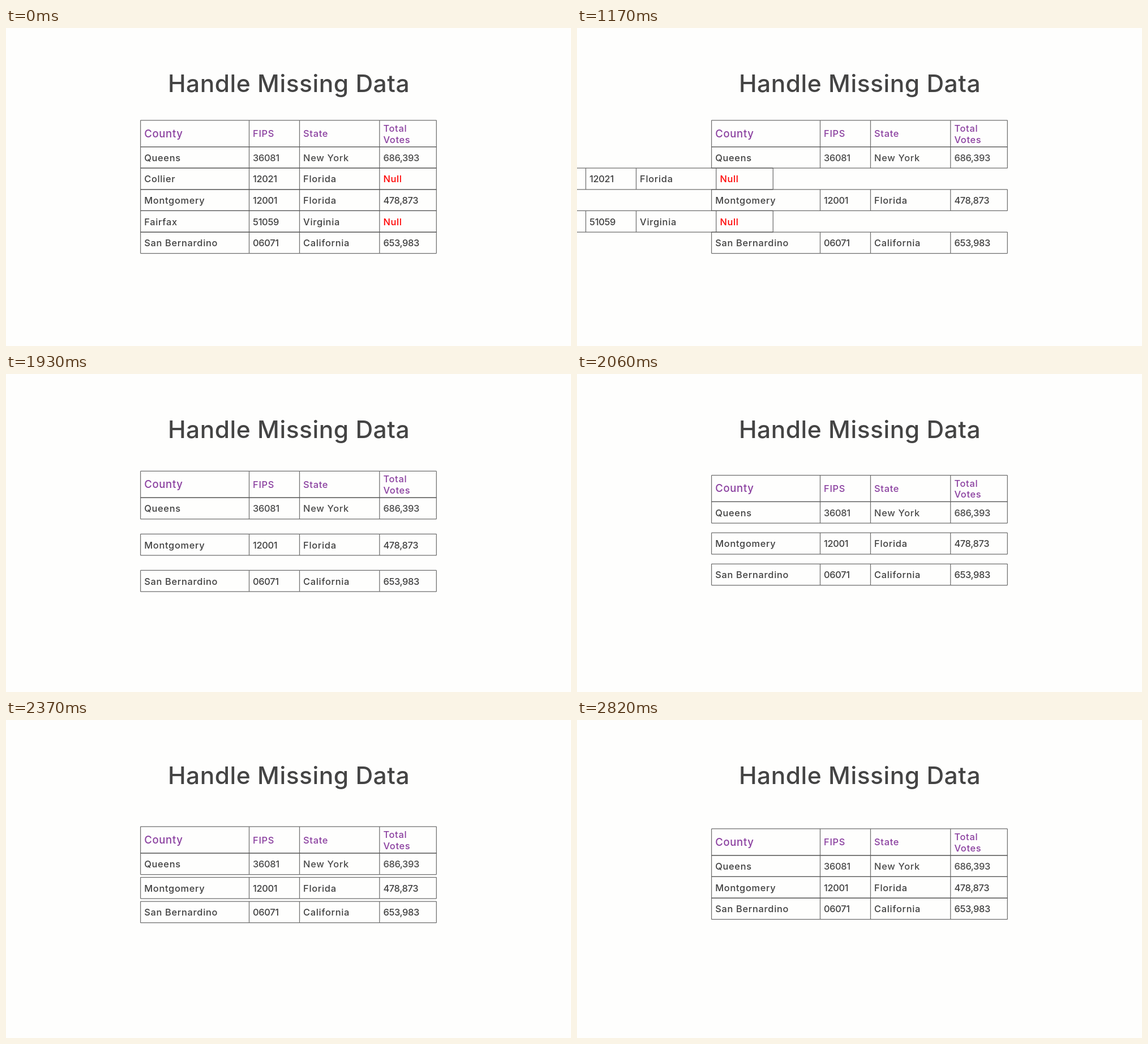
These frames come from a looping animation (998x561 px, 3.34 s). An HTML page:

```html
<!DOCTYPE html>
<html lang="en">
<head>
<meta charset="utf-8">
<title>Handle Missing Data</title>
<style>
  html, body { margin: 0; width: 100%; height: 100%; overflow: hidden; background: #fefefd; }
  svg { display: block; font: 550 16.4px Inter, sans-serif; letter-spacing: .042em; fill: #404040; }
  .title { font-size: 42.5px; font-weight: 500; letter-spacing: .012em; fill: #444; }
  .head { fill: #8a3f9f; }
  .big { font-size: 18.5px; }
  .light { font-weight: 500; fill: #4a4a4a; }
  .number { letter-spacing: -.02em; }
  .null { fill: #f00; }
  path { fill: none; stroke: #555; stroke-opacity: .85; stroke-width: 1.25; }
</style>
</head>
<body>
<svg width="998" height="561" viewBox="0 0 998 561">
  <text class="title" x="499.5" y="113" text-anchor="middle">Handle Missing Data</text>
</svg>
<script>
const LOOP = 3340, STEP = 34.28, DURATION = 1190;
const SLIDE_START = 890, CLOSE_START = 1680, SLIDE = 1135;
const COLUMNS = [237.6, 429.5, 518.5, 659.8, 760.3];
const HEAD_TOP = 162.8, BODY_TOP = 209.6, ROW = 37.6;
const svg = document.querySelector('svg');

function add(parent, tag, attrs, text = '') {
  const node = document.createElementNS(svg.namespaceURI, tag);
  for (const name in attrs) node.setAttribute(name, attrs[name]);
  node.textContent = text;
  return parent.appendChild(node);
}

function addRow(top, height) {
  const g = add(svg, 'g', {});
  const [left, right] = [COLUMNS[0], COLUMNS[4]];
  const rules = COLUMNS.map(x => `M${x} ${top}v${height}`).join('');
  add(g, 'path', { d: `M${left} ${top}H${right}M${left} ${top + height}H${right}${rules}` });
  return g;
}

const label = (g, column, y, text, className = '') =>
  add(g, 'text', { x: COLUMNS[column] + 6.6, y, class: className }, text);

const head = addRow(HEAD_TOP, BODY_TOP - HEAD_TOP);
label(head, 0, 192.6, 'County', 'head big');
label(head, 1, 192.3, 'FIPS', 'head');
label(head, 2, 192.3, 'State', 'head');
label(head, 3, 182.7, 'Total', 'head');
label(head, 3, 202.6, 'Votes', 'head');

const rows = [
  ['Queens', '36081', 'New York', '686,393'],
  ['Collier', '12021', 'Florida', 'Null'],
  ['Montgomery', '12001', 'Florida', '478,873'],
  ['Fairfax', '51059', 'Virginia', 'Null'],
  ['San Bernardino', '06071', 'California', '653,983'],
].map((cells, i) => {
  const top = BODY_TOP + i * ROW;
  const g = addRow(top, ROW);
  cells.forEach((text, column) => {
    const classes = [];
    if (/^\d/.test(text)) classes.push('number');
    if (text === 'Null') classes.push('null');
    if (i === 0 && column > 0) classes.push('light');
    label(g, column, top + 25.2, text, classes.join(' '));
  });
  return g;
});

// Cubic Bézier ease (.25, .1, .25, 1), solved by bisection.
function ease(x) {
  if (x <= 0) return 0;
  if (x >= 1) return 1;
  let low = 0, high = 1, s;
  for (let i = 0; i < 24; i++) {
    s = (low + high) / 2;
    if (.75 * s * (1 - s) + s ** 3 < x) low = s; else high = s;
  }
  return .3 * s * (1 - s) ** 2 + 3 * s * s * (1 - s) + s ** 3;
}

const move = (g, x, y) => g.setAttribute('transform', `translate(${x} ${y})`);

function draw(now) {
  const t = now % LOOP;
  const held = SLIDE_START + Math.floor((t - SLIDE_START) / STEP) * STEP;
  const slide = -SLIDE * ease((held - SLIDE_START) / DURATION);
  const close = ease((held - CLOSE_START) / DURATION);
  const shift = i => close * (-8.4 + (1 - i / 2) * ROW);
  move(head, 0, shift(0));
  rows.forEach((g, i) => i % 2 ? move(g, slide, 0) : move(g, 0, shift(i)));
}

const start = performance.now();
function tick() {
  draw(performance.now() - start);
  requestAnimationFrame(tick);
}
tick();
</script>
</body>
</html>
```
